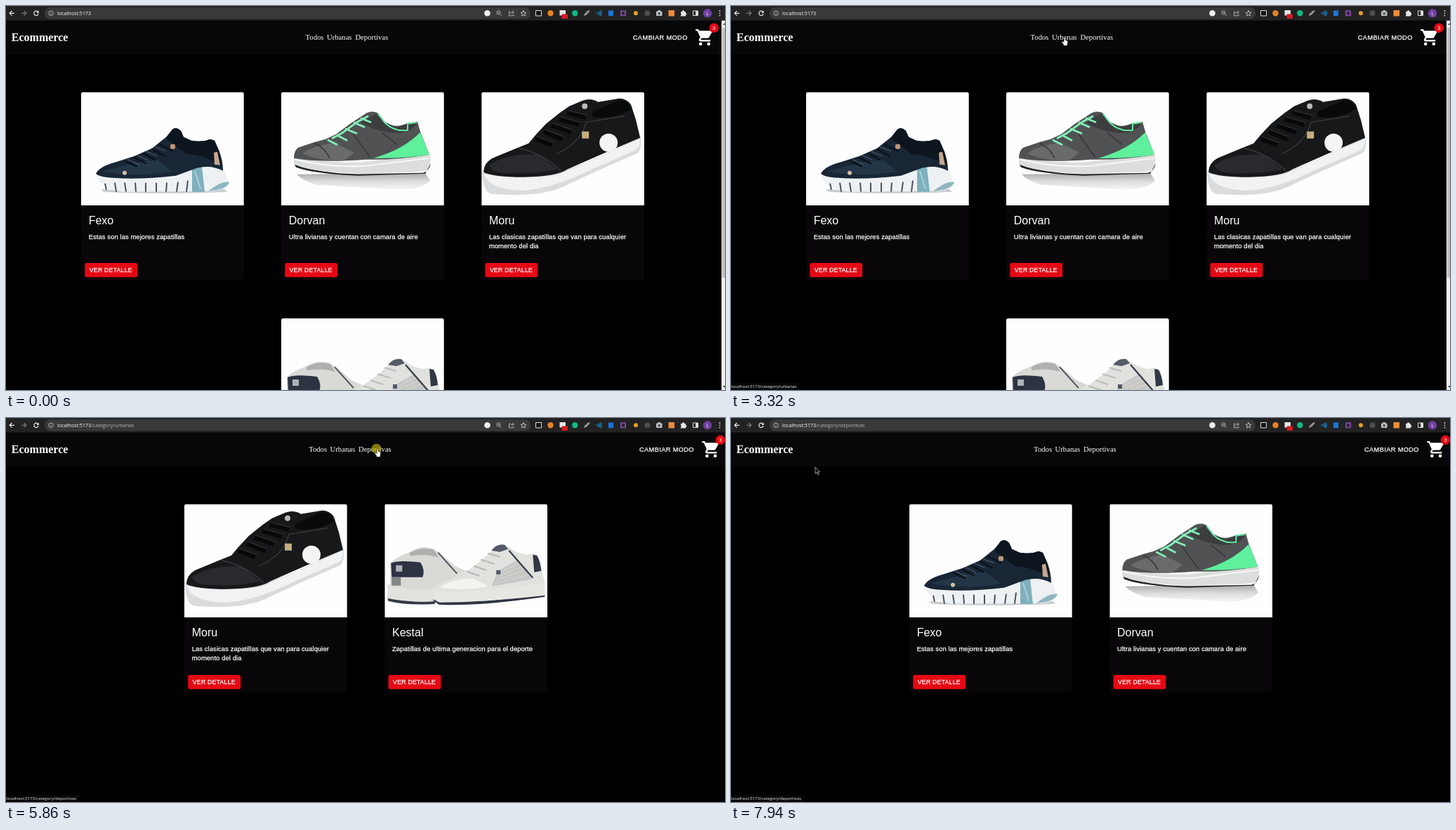
Write an HTML page with a canvas that moves like this. It is 1024 px wide and 547 px high and loops after 8000 ms.

```html
<!DOCTYPE html>
<html lang="es">
<head>
<meta charset="utf-8">
<title>Ecommerce</title>
<style>
html, body { margin: 0; width: 100%; height: 100%; overflow: hidden; background: #000; }
canvas { display: block; width: 1024px; height: 547px; }
</style>
</head>
<body>
<canvas id="stage" width="1024" height="547"></canvas>
<script>
const ctx = document.getElementById('stage').getContext('2d');
const LOOP = 8000;
const SANS = '"Liberation Sans", Arial, sans-serif';
const SERIF = '"Liberation Serif", "Times New Roman", serif';
const UI = '"Open Sans", "Noto Sans", sans-serif';
const RED = '#e50914';

function fill(color, d) {
  ctx.fillStyle = color;
  ctx.fill(new Path2D(d));
}
function line(color, width, d) {
  ctx.strokeStyle = color;
  ctx.lineWidth = width;
  ctx.stroke(new Path2D(d));
}
function rect(color, x, y, w, h, r = 0) {
  ctx.fillStyle = color;
  ctx.beginPath();
  ctx.roundRect(x, y, w, h, r);
  ctx.fill();
}
function dot(color, x, y, r) {
  ctx.fillStyle = color;
  ctx.beginPath();
  ctx.arc(x, y, r, 0, Math.PI * 2);
  ctx.fill();
}
function text(str, x, y, font, color = '#fff', spacing = 0, align = 'left') {
  ctx.font = font;
  ctx.fillStyle = color;
  ctx.letterSpacing = spacing + 'px';
  ctx.textAlign = align;
  ctx.fillText(str, x, y);
}
// Small sans text with a slightly heavier stem
function label(str, x, y, size, spacing) {
  text(str, x, y, `${size}px ${SANS}`, '#fff', spacing);
  ctx.strokeStyle = '#fff';
  ctx.lineWidth = .25;
  ctx.strokeText(str, x, y);
}
function at(x, y, draw, scale = 1) {
  ctx.save();
  ctx.translate(x, y);
  ctx.scale(scale, scale);
  draw();
  ctx.restore();
}

// Product pictures, each in a 231 x 161 box
function navyShoe() {
  fill('#c9cdd0', 'M28 138Q90 144 204 138L208 142Q110 146 32 142Z');
  fill('#eef1f3', 'M20 115Q30 121 60 121L130 117L160 107L203 107Q207 122 211 130Q206 139 190 141L60 142Q26 138 20 115Z');
  line('#47525d', 2, 'M34 130L36 139M48 129L50 142M62 129L64 142M77 129L78 142M92 129L92 142M107 129L107 142M122 129L121 142M138 128L136 142M152 126L150 142');
  fill('#7fb0bd', 'M158 108L172 106L176 142H158Z');
  line('#a9d0d8', 2, 'M162 112L170 138');
  fill('#8fb5c0', 'M181 141Q200 126 211 128Q208 139 181 141Z');
  fill('#182635', 'M21 116Q26 106 48 100L76 91L101 80L121 64L130 53Q136 49 142 55L146 64L157 69Q172 72 184 67L190 69L197 85Q202 98 202 112Q185 103 165 108L135 119Q85 125 45 122Q26 121 21 116Z');
  fill('#0d151f', 'M121 66L130 53Q136 49 142 55L146 64L157 69Q172 72 184 67L190 69L197 85L200 105Q178 90 150 88Z');
  fill('#223648', 'M30 113Q70 101 108 96L130 113Q80 122 30 113Z');
  line('#0a1119', 2.4, 'M62 98L80 106M75 93L93 102M88 87L106 97M100 81L119 91M111 74L131 84');
  line('#566778', 1, 'M66 96L82 103M80 90L95 97M92 84L108 91M105 78L121 84');
  rect('#bd967a', 127, 74, 7, 7, 2);
  fill('#c6a68e', 'M189 86L194 85L198 104L190 103Z');
  dot('#d5c0a2', 62, 115, 3);
}

function grayShoe() {
  const fade = ctx.createLinearGradient(0, 114, 0, 144);
  fade.addColorStop(0, '#a5a5a5');
  fade.addColorStop(.45, '#dedede');
  fade.addColorStop(1, '#fff');
  fill(fade, 'M22 117L205 115L212 126Q195 142 155 138L50 132Q30 126 22 117Z');
  fill('#222527', 'M19 103Q50 115 110 117L202 115Q211 112 213 101L205 116L110 119Q45 116 21 107Z');
  fill('#dcdedd', 'M18 92Q50 100 110 100L211 88Q215 98 209 109Q204 114 180 114L110 116Q35 113 18 102Z');
  line('#f7f7f7', 2, 'M20 96Q70 108 120 105L211 94');
  fill('#505254', 'M18 94Q18 84 24 79L48 71L63 67L78 60L98 45L118 32Q128 25 138 30L147 42Q162 53 180 44L194 42L198 56L211 89Q165 97 120 96Q55 101 18 94Z');
  fill('#686a6b', 'M30 87Q46 76 76 72L104 86L90 97Q50 98 30 87Z');
  fill('#3b3d3f', 'M113 43L135 31L146 42L164 50L180 45L193 44Q183 62 151 57Q131 54 113 43Z');
  fill('#5ef09c', 'M131 94Q174 82 198 57L211 89Q174 95 131 94Z');
  line('#83efb6', 2.8, 'M66 68L80 75M79 61L94 69M91 52L108 59M103 43L119 50M113 37L128 43M72 66L87 58L98 50L109 42L124 34');
  line('#66e9a3', 2, 'M138 31L147 43Q161 57 180 54L180 45L193 43');
  line('#343638', 1.5, 'M48 73Q62 79 69 94M103 60L127 93M144 58L165 75');
}

function blackShoe() {
  fill('#d9dbdd', 'M1 114Q2 142 14 145Q54 148 84 144Q108 140 124 131L172 109L222 87Q229 80 227 64L150 100L105 116Z');
  fill('#f1f2f3', 'M3 116Q45 126 108 118L151 100L226 66Q227 78 219 83L150 113Q104 136 62 140Q10 140 3 116Z');
  fill('#17181a', 'M3 114Q3 100 18 93L52 79L67 73L77 61L92 45L112 29L125 20L144 12Q156 8 166 14L196 9Q207 9 213 18L220 40L226 65L172 88L122 110Q108 120 60 121Q17 121 3 114Z');
  fill('#282a2d', 'M11 104Q37 86 82 89L108 110Q75 118 30 115Q14 113 11 104Z');
  fill('#080909', 'M158 28L197 11Q209 12 213 24Q187 40 158 35Z');
  line('#3c3e41', 1.2, 'M53 80Q87 87 113 112M107 88Q142 72 149 43L204 34');
  line('#070809', 7, 'M77 66L101 75M89 56L116 67M100 47L128 57M111 38L139 46M122 29L149 36');
  line('#35373a', 1.1, 'M78 63L103 72M90 53L118 64M101 44L130 54M112 35L141 43M123 26L151 33');
  dot('#b9babb', 147, 20, 4);
  rect('#c4ad7f', 143, 56, 10, 10);
  dot('#f3f4f5', 181, 72, 13);
}

function whiteShoes() {
  fill('#343948', 'M4 132Q40 142 72 138V142Q35 145 5 138Z');
  fill('#e2e2df', 'M4 114L78 122V138Q30 140 4 134Z');
  fill('#d9d9d6', 'M8 116V84Q13 77 36 68Q52 58 68 63L79 70L100 88L116 95L82 120Q40 125 8 116Z');
  fill('#aeb0ae', 'M36 69Q53 60 70 65L77 76Q58 70 36 74Z');
  fill('#2d3342', 'M9 84Q20 79 51 83Q58 94 54 104H10Z');
  rect('#aeb2b8', 16, 87, 9, 9);
  rect('#858687', 10, 104, 13, 12);
  line('#4e535d', 2, 'M76 69L103 99');
  fill('#303544', 'M68 136Q120 144 228 128V132Q130 146 77 143Z');
  fill('#e6e6e3', 'M70 120Q112 130 228 109V130Q140 140 78 140Q66 136 70 120Z');
  fill('#e1e1de', 'M70 121Q76 111 96 106L120 93L140 78L152 67Q159 56 171 58L184 66Q202 75 211 70Q220 74 223 91L228 112Q150 124 98 125Q80 125 70 121Z');
  fill('#f3f3f0', 'M78 118Q100 105 127 106L148 117Q110 125 78 118Z');
  fill('#c6c7c4', 'M160 96L190 79L209 107L153 117Z');
  ctx.save();
  ctx.setLineDash([1, 2]);
  line('#eeeeeb', 1.3, 'M163 98L191 84M162 103L195 89M160 108L199 94M158 113L204 101');
  ctx.restore();
  line('#373d4c', 2.3, 'M177 66L211 105');
  fill('#313746', 'M211 72L217 73Q222 82 223 95L213 97Z');
  fill('#555b66', 'M152 66Q160 56 171 58L176 64L164 68Z');
  line('#b7b8b5', 2, 'M117 96L135 102M127 88L145 94M137 79L156 85M147 70L164 75');
  rect('#505763', 159, 94, 6, 6);
}

const products = {
  navy: { art: navyShoe, name: 'Fexo', lines: ['Estas son las mejores zapatillas'] },
  gray: { art: grayShoe, name: 'Dorvan', lines: ['Ultra livianas y cuentan con camara de aire'] },
  black: { art: blackShoe, name: 'Moru', lines: ['Las clasicas zapatillas que van para cualquier', 'momento del dia'] },
  white: { art: whiteShoes, name: 'Kestal', lines: ['Zapatillas de ultima generacion para el deporte'] }
};

function card(key, x, y = 122.7) {
  const item = products[key];
  at(x, y, () => {
    rect('#080609', 0, 0, 231.7, 268, 2.7);
    ctx.save();
    ctx.beginPath();
    ctx.roundRect(0, 0, 231.7, 161.3, [2.7, 2.7, 0, 0]);
    ctx.clip();
    rect('#fefefe', 0, 0, 232, 162);
    item.art();
    ctx.restore();
    text(item.name, 10.7, 188.3, `16px ${SANS}`);
    item.lines.forEach((s, i) => label(s, 10.7, 209.2 + i * 13.4, 9.33, .12));
    rect(RED, 5.3, 243.2, 74.8, 20.4, 2.7);
    label('VER DETALLE', 11.8, 256.6, 8.67, .27);
  });
}

function cart() {
  fill('#fff', 'M1 2H4.3L5.2 4H20.2Q21.7 4.2 21 5.7L17.3 12Q16.7 13 15.5 13H8.1L7.2 15H19V17H7Q4 16.5 5.3 14L6.6 11.6L3 4H1Z');
  dot('#fff', 7, 20, 2);
  dot('#fff', 17, 20, 2);
}

function navbar(shift) {
  rect('#070609', 0, 20, 1024, 49);
  text('Ecommerce', 7.8, 50, `bold 16px ${SERIF}`);
  const links = { Todos: 426.6, Urbanas: 457, Deportivas: 497.4 };
  for (const [name, x] of Object.entries(links)) {
    text(name, x + shift / 2, 48.3, `10.67px ${SERIF}`);
  }
  label('CAMBIAR MODO', 892.8 + shift, 47.8, 9.33, .32);
  at(981 + shift, 30.7, cart, 1.167);
  dot(RED, 1008.3 + shift, 31.3, 6.7);
  text('3', 1008.3 + shift, 34.2, `8px ${SANS}`, '#fff', 0, 'center');
}

function toolbar(path) {
  rect('#222222', 0, 0, 1024, 20.5);
  rect('#393939', 55, 2, 692, 16.5, 8);
  const arrow = 'M3.5 0H-3.2M0-3.3L-3.3 0L0 3.3';
  at(8.5, 10.3, () => line('#eee', 1.2, arrow));
  at(25.5, 10.3, () => { ctx.scale(-1, 1); line('#777', 1.2, arrow); });
  at(43, 10.3, () => {
    line('#eee', 1.2, 'M2.5-2A3.2 3.2 0 1 0 3.1 1');
    fill('#eee', 'M3.7-3.8V-.4H.3Z');
  });
  at(64, 10.3, () => line('#ccc', .8, 'M3.3 0A3.3 3.3 0 1 0-3.3 0A3.3 3.3 0 1 0 3.3 0M0-.4V1.8M0-1.9V-1.1'));
  const host = 'localhost:5173';
  text(host, 73, 12.9, `7.15px ${UI}`);
  text(path, 73 + ctx.measureText(host).width, 12.9, `7.15px ${UI}`, '#b5b5b5');

  dot('#eee', 685.5, 10.3, 4.3);
  at(702, 10, () => line('#bbb', .9, 'M2-.6A2.6 2.6 0 1 0-3.2-.6A2.6 2.6 0 1 0 2-.6M1.2 1.4L3.8 4M-2-.6H.8'));
  at(720, 10.3, () => line('#bbb', .9, 'M-1-2H-3.5V3.5H3V1.5M-1.5 1Q-1-1.5 3-1.5M1.2-3.6L3.5-1.5L1.2.6'));
  at(737, 10.3, () => line('#ccc', .9, 'M0-4L1.1-1.2L4-1L1.8.9L2.5 3.7L0 2.1L-2.5 3.7L-1.8.9L-4-1L-1.1-1.2Z'));

  rect('#ddd', 754, 6, 9, 8.5, 1);
  rect('#151515', 755, 7, 7, 6.5);
  dot('#e58225', 775.5, 10.3, 4.2);
  rect('#e6e6e6', 788.5, 6, 8.5, 7.5);
  rect('#d71920', 791.5, 11.5, 8.5, 6.5, 1);
  dot('#13b886', 810.3, 10.3, 4.2);
  at(827, 10.3, () => line('#aaa', 1.3, 'M-3.5 3.5Q-1-2 3.5-3.5Q2 1-3 2.5'));
  at(844, 10.3, () => line('#168bd8', 1.2, 'M-3-1V1M-1-2Q.5 0-1 2M1-3Q3 0 1 3M2.8-4Q5.5 0 2.8 4'));
  rect('#1976d9', 858, 6.4, 7, 7.8);
  rect('#7f4aa5', 875, 6.3, 8, 8);
  rect('#2b2230', 877, 8.1, 4, 4.5);
  dot('#e3a02d', 897, 10.3, 3);
  dot('#4d4d4d', 913.5, 10.3, 4);
  rect('#c0c3c5', 926, 7.5, 8.5, 6.5, 1);
  rect('#c0c3c5', 928.5, 6, 3.5, 2);
  dot('#42484b', 930.2, 10.8, 1.8);
  rect('#ef8c37', 943.5, 6, 8.5, 8.5);
  fill('#e6e6e6', 'M961 8H963Q963 6 964.5 6T966 8H968V10.2Q969.5 10.2 969.5 11.5T968 12.8V14.5H961V12.5Q963 12 961 10.5Z');
  rect('#e1e1e1', 978, 6.5, 8, 7.5, 1);
  rect('#222', 979, 7.5, 3.2, 5.5);
  dot('#7040a0', 999, 10.3, 6.2);
  text('L', 999, 12.8, `7px ${UI}`, '#fff', 0, 'center');
  for (const y of [7, 10.3, 13.6]) dot('#ddd', 1016.5, y, .9);
}

function scrollbar() {
  rect('#f1f1f1', 1019, 20.5, 5, 527);
  rect('#c1c1c1', 1019.8, 31, 4.2, 356);
  fill('#505050', 'M1021 27L1023.5 24L1026 27Z');
  fill('#505050', 'M1021 541L1023.5 544L1026 541Z');
}

function statusText(str) {
  ctx.font = `6.1px ${UI}`;
  rect('#080808', 0, 537, ctx.measureText(str).width + 4, 10, [0, 2, 0, 0]);
  text(str, 0, 543.6, `6.1px ${UI}`, '#eee');
}

// Pointer path: time, x, y
const track = [
  [690, 996, 536], [890, 785, 385], [1090, 600, 215], [1310, 529, 141],
  [1390, 529, 141], [1440, 524, 122], [1500, 524, 122], [1720, 501, 82],
  [2060, 470, 39], [2250, 470, 39], [2460, 475, 44], [4710, 475, 44],
  [4940, 505, 47], [5150, 529, 43], [7590, 529, 43], [7740, 330, 56],
  [7940, 120, 70], [8000, 120, 70]
];
function pointerAt(t) {
  const i = track.findIndex(k => k[0] > t);
  const [t0, x0, y0] = track[i - 1], [t1, x1, y1] = track[i];
  const u = (t - t0) / (t1 - t0);
  return [x0 + (x1 - x0) * u, y0 + (y1 - y0) * u];
}
function pointer(t) {
  if (t < track[0][0]) return;
  const [x, y] = pointerAt(t);
  const hand = t >= 2300 && t < 7630;
  const clicked = (t >= 3190 && t < 3320) || (t >= 5860 && t < 5990);
  if (clicked) dot('rgba(190,178,0,.68)', x - 1.5, y + .8, 7);
  const shape = hand
    ? 'M-1 .8Q0-.6 1 .8V4.5L4 5.2Q5 5.6 4.8 7L4 10.5V12.5H-1.5V10.8L-4 7.4Q-4.2 6-2.8 6.2L-1 7.5Z'
    : 'M0 0V9.3L2.2 7.3L3.7 10.7L5.2 10L3.7 6.8H6.5Z';
  at(x, y, () => {
    fill(hand ? '#fff' : '#000', shape);
    line(hand ? '#000' : '#fff', .6, shape);
  });
}

function render(t) {
  const home = t < 3400, urban = !home && t < 5990;
  ctx.fillStyle = '#000';
  ctx.fillRect(0, 0, 1024, 547);
  navbar(home ? 0 : 9.2);
  if (home) {
    card('navy', 107);
    card('gray', 392);
    card('black', 677.2);
    card('white', 392, 445.1);
    scrollbar();
  } else {
    card(urban ? 'black' : 'navy', 254);
    card(urban ? 'white' : 'gray', 539.3);
  }
  toolbar(home ? '' : urban ? '/category/urbanas' : '/category/deportivas');
  if (t >= 2330) statusText('localhost:5173/category/' + (t < 4950 ? 'urbanas' : 'deportivas'));
  pointer(t);
}

const start = performance.now();
function tick() {
  render((performance.now() - start) % LOOP);
  requestAnimationFrame(tick);
}
tick();
</script>
</body>
</html>
```
